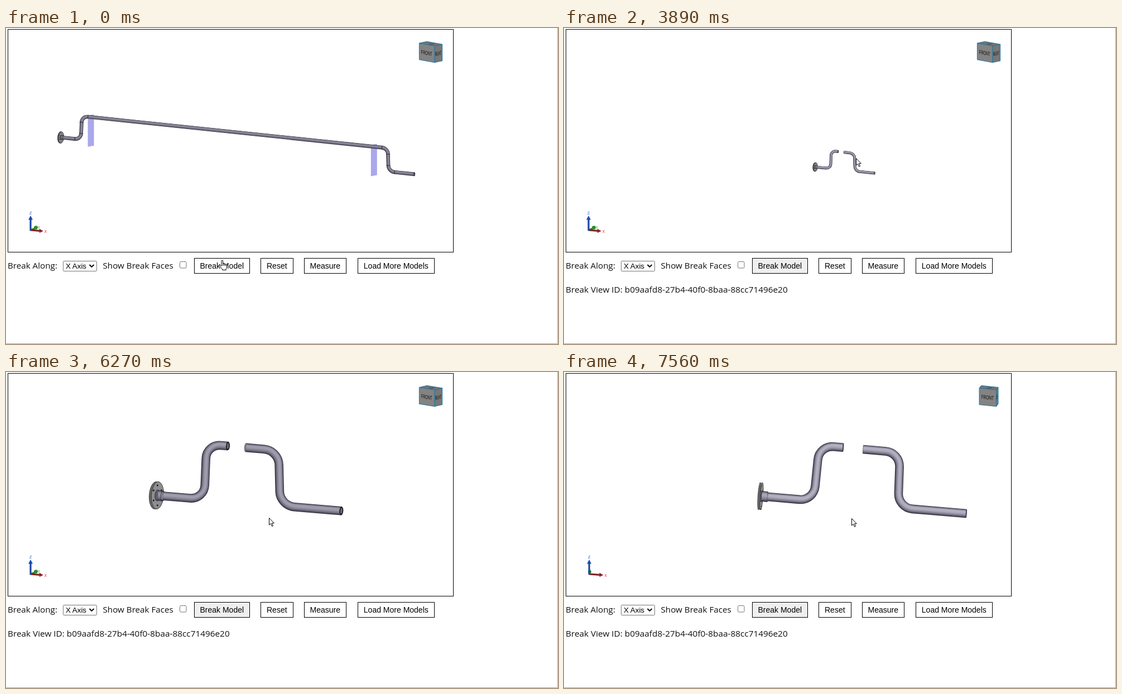
These frames come from a looping animation (989 by 566 pixels, 7.99 s). An HTML page:

```html
<!DOCTYPE html>
<html lang="en">
<head>
<meta charset="utf-8">
<title>Break view</title>
<style>
html, body { margin: 0; width: 100%; height: 100%; overflow: hidden; background: #fff; }
svg { display: block; width: 989px; height: 566px; }
.label { font: 15.2px "Open Sans", "Noto Sans", sans-serif; fill: #111; }
.ui { font: 14px "Liberation Sans", Arial, sans-serif; fill: #000; text-anchor: middle; }
.axis { font: 7px "Liberation Sans", Arial, sans-serif; text-anchor: middle; }
.face { font: 10px "Liberation Sans", Arial, sans-serif; fill: #111; text-anchor: middle; }
</style>
</head>
<body>
<svg viewBox="0 0 989 566">
  <rect width="989" height="566" fill="#fff"/>
  <path d="M988.5 0V565.5H0" fill="none" stroke="#a6a6a6"/>
  <rect x="3.5" y="2.5" width="798" height="399" fill="#fff" stroke="#000"/>
  <g id="model"></g>
  <g id="cube"></g>
  <g id="triad"></g>
  <text class="label" x="3" y="431">Break Along:</text>
  <rect x="102.5" y="417.5" width="60" height="18" rx="1" fill="#fff" stroke="#767676"/>
  <text class="ui" x="107" y="431" style="font-size:13.33px;text-anchor:start">X Axis</text>
  <path d="M149.5 424l4 4 4-4" fill="none" stroke="#000" stroke-width="1.9"/>
  <text class="label" x="173.5" y="431">Show Break Faces</text>
  <rect x="311.5" y="418.5" width="11.5" height="11.5" rx="2" fill="#fff" stroke="#767676"/>
  <g id="buttons"></g>
  <text class="label" id="viewId" x="3" y="473.5" style="font-size:15.35px">Break View ID: b09aafd8-27b4-40f0-8baa-88cc71496e20</text>
  <g id="cursor" stroke="#000" stroke-linejoin="round" fill="#fff">
    <path id="hand" d="M4 11.5V2.2a1.3 1.3 0 0 1 2.7 0V7.6q.1-1.1 1.2-1t1.2 1.4q.1-.9 1.1-.8t1.1 1.4q.2-.7 1.1-.6t1 1.4V13q0 2-1.2 3.6V18.5H5.6V17L1 11.6q-.6-1.2.4-1.7t2.6 1.6zM6.7 7.6V11M9.1 8V11M11.3 8.6V11"/>
    <path id="arrow" d="M0 0V12.5L2.9 9.9 5 14.8l2-.9-2.1-4.7H8.8z"/>
  </g>
</svg>
<script>
const LOOP = 7990, STEP = 215, SLACK = 20, BREAK = 2380;
const WHEEL = 1.2546;               // scale per zoom notch
const GAP = 1309;                   // length taken out by the break
const LEG = 99, WIDTH = 15.6;
const $ = id => document.getElementById(id);

// Each move starts at a time, takes some steps and ends in the given view.
// turn is the sine of the yaw, roll the slope of the x axis, model the flange centre.
const MOVES = [
  { at: 0, steps: 1, zoom: -3.8, turn: .45, roll: .104, model: [98, 196], cursor: [382, 415] },
  { at: 220, steps: 4, cursor: [379, 427] },
  { at: BREAK, steps: 1, zoom: -6, model: [463, 254] },
  { at: 3010, steps: 5, zoom: -5, model: [450, 249], cursor: [523.5, 233.5] },
  { at: 4110, steps: 4, zoom: -1, model: [321, 243], cursor: [548, 297.5] },
  { at: 5400, steps: 5, zoom: 0, roll: .084, model: [269.5, 221], cursor: [471.5, 261.5] },
  { at: 6490, steps: 2, turn: .29, roll: .091, model: [313, 229], cursor: [491.5, 266.5] },
  { at: 6910, steps: 3, turn: .11, roll: .084, model: [352, 222.5], cursor: [513.5, 262.5] },
  { at: 7560, steps: 1, cursor: [515.5, 262.5] }
];
MOVES.forEach((m, i) => MOVES[i] = { ...MOVES[i - 1], ...m });

const mix = (a, b, f) => Array.isArray(a) ? a.map((v, i) => mix(v, b[i], f)) : a + (b - a) * f;
const n = v => v.toFixed(2);
const at = p => n(p[0]) + " " + n(p[1]);
const poly = (pts, fill, extra = "") => `<path d="M${pts.map(at).join("L")}Z" fill="${fill}" ${extra}/>`;
const line = (d, color, w, extra = "") => `<path d="${d}" fill="none" stroke="${color}" stroke-width="${n(w)}" ${extra}/>`;
const oval = (c, rx, ry, fill, extra = "") =>
  `<ellipse rx="${n(rx)}" ry="${n(ry)}" transform="translate(${at(c)}) rotate(4)" fill="${fill}" ${extra}/>`;
const steel = l => `rgb(${[l, l - 2, l + 14].map(Math.round)})`;

// The zoom moves in whole notches; the rest follows it, or the steps if the zoom rests
function viewAt(t) {
  const i = MOVES.filter(m => m.at <= t).length - 1;
  const to = MOVES[i], from = MOVES[Math.max(0, i - 1)];
  const f = Math.min(1, (Math.floor((t - to.at + SLACK) / STEP) + 1) / to.steps);
  const zoom = f < 1 ? from.zoom + Math.trunc((to.zoom - from.zoom) * f + .001) : to.zoom;
  const [s, s0, s1] = [zoom, from.zoom, to.zoom].map(z => WHEEL ** z);
  const g = s0 === s1 ? f : (s - s0) / (s1 - s0);
  const turn = mix(from.turn, to.turn, g);
  return {
    scale: s, turn, cos: Math.sqrt(1 - turn * turn),
    roll: mix(from.roll, to.roll, g),
    model: mix(from.model, to.model, g),
    cursor: mix(from.cursor, to.cursor, f)
  };
}

// Point of the pipe's plane on the screen; uprights lean with the turn and perspective
function project(v, x, z, shift = 0) {
  const run = (x + shift) * v.cos;
  const lean = z * (.12 - .176 * v.turn - .00043 * (x - 96));
  return [v.model[0] + (run + lean) * v.scale, v.model[1] + (run * v.roll - z) * v.scale];
}

function toward(a, b, d) {
  return mix(a, b, d / Math.hypot(b[0] - a[0], b[1] - a[1]));
}

// Pipe along the points with rounded corners, shaded from dark edge to bright core
function pipe(pts, w, peak, seams) {
  const r = w * 1.65;
  let d = "M" + at(pts[0]), marks = "";
  for (let i = 1; i < pts.length - 1; i++) {
    const c = pts[i], a = toward(c, pts[i - 1], r), b = toward(c, pts[i + 1], r);
    d += `L${at(a)}C${at(mix(a, c, .56))} ${at(mix(b, c, .56))} ${at(b)}`;
    for (const s of [a, b]) {
      const h = w / 2 / r, nx = (c[1] - s[1]) * h, ny = (s[0] - c[0]) * h;
      marks += `M${at([s[0] - nx, s[1] - ny])}L${at([s[0] + nx, s[1] + ny])}`;
    }
  }
  d += "L" + at(pts[pts.length - 1]);
  let out = "";
  for (let f = 0; f < 1; f += .14) {
    const tone = mix(52, peak, Math.sin(f * Math.PI / 2) ** .8);
    out += line(d, steel(tone), w * (1 - f * .92), `transform="translate(${n(w * f * .08)} ${n(-w * f * .16)})"`);
  }
  return out + (seams ? line(marks, "#25242c", 1) : "");
}

function openEnd(c, w, k) {
  const rx = Math.max(w * k / 2, 1);
  return oval(c, rx, w / 2, "#1d1c22") + oval(c, rx * .5, w * .32, "#6f6d78");
}

function flange(c, start, w, k, peak) {
  const ry = w * 1.57, rx = ry * k, edge = 'stroke="#222" stroke-width=".8"';
  const back = [c[0] - w * .12, c[1]], front = [c[0] + w * .12, c[1]];
  const rim = [[back[0], c[1] - ry], [front[0], c[1] - ry], [front[0], c[1] + ry], [back[0], c[1] + ry]];
  let s = oval(back, rx, ry, "#6a6a6c", edge) + poly(rim, "#6a6a6c") + oval(front, rx, ry, "#8e8e8f", edge);
  for (let i = 0; i < 6; i++) {
    const a = (i + .5) * Math.PI / 3;
    s += oval([front[0] + Math.cos(a) * rx * .73, front[1] + Math.sin(a) * ry * .73], w * .19 * k + .1, w * .11, "#1b1b1d");
  }
  return s + oval(front, w * .64 * k, w * .64, steel(95), edge) +
    pipe([front, start], w * 1.2, peak - 10) +
    oval(start, w * .6 * k, w * .6, "#25242b") + oval(start, w * .5 * k, w * .5, steel(peak - 25));
}

function drawModel(v, broken) {
  const w = WIDTH * v.scale, k = v.turn, peak = broken ? 186 - 56 * k : 140;
  const shift = broken ? 0 : GAP;
  const hub = project(v, 0, 0), start = project(v, 13, 0);
  const left = [start, project(v, 96, 0), project(v, 96, LEG), project(v, 141, LEG)];
  const right = [[178.5, LEG], [248, LEG], [248, 0], [371, 0]].map(([x, z]) => project(v, x, z, shift));
  const base = flange(hub, start, w, k, peak), tip = openEnd(right[3], w, k);
  if (broken) {
    return base + pipe(left, w, peak) + openEnd(left[3], w, k) +
      oval(right[0], w * k * .4, w / 2, steel(peak - 30)) + pipe(right, w, peak) + tip;
  }
  const plane = ([x, y]) => poly([[x - 5.5, y - 3], [x + 5.5, y - 5], [x + 5.5, y + 51], [x - 5.5, y + 53]],
    "#6762dc", 'fill-opacity=".56"');
  return plane(left[3]) + plane(right[0]) + base +
    pipe([...left.slice(0, 3), ...right.slice(1)], w, peak, true) + tip;
}

function drawCube(v) {
  const size = 30.7, edge = 'stroke="#24759f" stroke-linejoin="round"';
  const corner = (a, b, z) => {
    const x = (a * v.cos - b * v.turn) * size / 2, near = (a * v.turn + b * v.cos) * size / 2;
    return [761 + x, 43 + x * v.roll + near * .16 - z * 14.8];
  };
  const face = (list, fill) => poly(list.map(p => corner(...p)), fill, edge);
  const word = (text, p, q, scale) => {
    const slope = (q[1] - p[1]) / (q[0] - p[0]), c = mix(p, q, .5);
    return `<text class="face" transform="matrix(${n(scale)} ${n(scale * slope)} 0 1 ${n(c[0] - .5)} ${n(c[1] + 18.5)})">${text}</text>`;
  };
  const l = corner(-1, 1, 1), m = corner(1, 1, 1), r = corner(1, -1, 1), top = mix(l, r, .5);
  return face([[-1, 1, 1], [-1, -1, 1], [1, -1, 1], [1, 1, 1]], "#747474") +
    face([[1, 1, 1], [1, -1, 1], [1, -1, -1], [1, 1, -1]], "#777") +
    face([[-1, 1, 1], [1, 1, 1], [1, 1, -1], [-1, 1, -1]], "#838383") +
    word("FRONT", l, m, .65 * v.cos) + word("RIGHT", m, r, .8 * v.turn) +
    `<text class="face" style="font-size:5px" transform="matrix(1 .04 -.6 .5 ${n(top[0])} ${n(top[1] + 1.3)})">TOP</text>`;
}

function drawTriad(v) {
  const x = 45.5 - v.turn * 3.3, len = 25.5;
  const tip = [x + len * v.cos, 363.8], y = [x + len * v.turn, 357.5];
  return line(`M${at([x, 362])}L${at(y)}`, "#2b7d25", 3) +
    oval([y[0] - 2, y[1]], 2.5 + v.turn * 2, 3.2, "#2c8a28") +
    `<text class="axis" x="${n(x + len * v.turn * 1.3)}" y="360" fill="#35a035" opacity="${v.turn > .2 ? 1 : 0}">Y</text>` +
    line(`M${at([x, 362])}L${at([tip[0] - 6, 363.3])}`, "#7b2429", 3.2) +
    poly([[tip[0] - 7, 359.5], tip, [tip[0] - 7, 367]], "#8d252b") +
    line(`M${at([x, 363])}V343`, "#1d479f", 3.2) +
    poly([[x - 4, 343.5], [x, 336], [x + 4, 343.5]], "#174db5") +
    `<text class="axis" x="${n(x)}" y="333.5" fill="#2755c9">Z</text>` +
    `<text class="axis" x="${n(tip[0] + 4)}" y="366.5" fill="#c83038">X</text>`;
}

function button(text, x, w, fill = "#fff") {
  return `<rect x="${x + .5}" y="412.5" width="${w}" height="27" fill="${fill}" stroke="#000"/>` +
    `<text class="ui" x="${x + w / 2 + .3}" y="431">${text}</text>`;
}

function draw(t) {
  const v = viewAt(t), broken = t >= BREAK;
  const onButton = v.cursor[1] > 405;
  $("model").innerHTML = drawModel(v, broken);
  $("cube").innerHTML = drawCube(v);
  $("triad").innerHTML = drawTriad(v);
  $("buttons").innerHTML = button("Break Model", 337, 99, onButton ? "#fff" : "#efefef") +
    button("Reset", 456, 58) + button("Measure", 534, 75) + button("Load More Models", 630, 137);
  $("viewId").style.display = broken ? "" : "none";
  $("hand").style.display = onButton ? "" : "none";
  $("arrow").style.display = onButton ? "none" : "";
  $("cursor").setAttribute("transform", `translate(${at(v.cursor)})`);
}

const begin = performance.now();
function tick() {
  draw((performance.now() - begin) % LOOP);
  requestAnimationFrame(tick);
}
tick();
</script>
</body>
</html>
```
